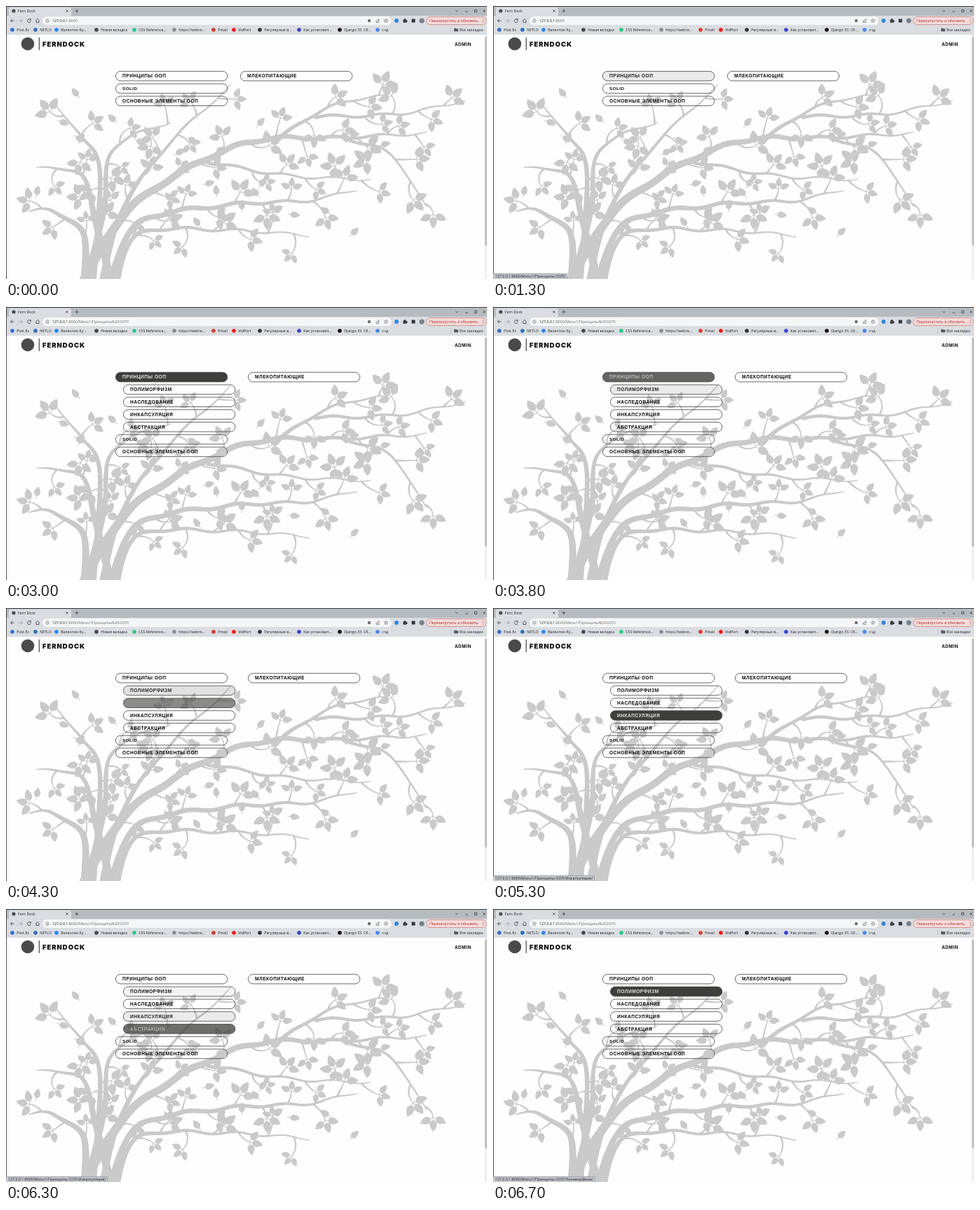
Recreate the animation shown at these times as an HTML page with a canvas. Size 686 px wide and 390 px high, loop 8000 ms.

```html
<!DOCTYPE html>
<html lang="ru">
<head>
<meta charset="utf-8">
<title>Fern Dock</title>
<style>
  html, body { margin: 0; width: 100%; height: 100%; overflow: hidden; background: #fefefe; }
  canvas, svg { position: absolute; left: 0; top: 0; }
  text, #status { font: 5.3px "Open Sans", sans-serif; white-space: pre; }
  .item text { font: bold 6.6px "Liberation Sans", sans-serif; letter-spacing: .52px; }
  .brand { font: 900 9.5px Inter, sans-serif; letter-spacing: .95px; }
  .admin { font: bold 6.2px Inter, sans-serif; letter-spacing: .45px; }
  #status { position: absolute; left: 0; bottom: 0; height: 7px; line-height: 7px; padding: 0 2px 0 3px;
    background: #c3c6ca; color: #17191c; border-top: .5px solid #a0a3a7; border-right: .5px solid #a0a3a7; }
</style>
</head>
<body>
<canvas id="tree" width="686" height="390"></canvas>
<svg id="stage" width="686" height="390"></svg>
<div id="status"></div>
<script>
const stage = document.getElementById('stage');
const statusBar = document.getElementById('status');

function add(parent, tag, attrs, content) {
  const node = document.createElementNS('http://www.w3.org/2000/svg', tag);
  for (const key in attrs) node.setAttribute(key, attrs[key]);
  if (content) node.textContent = content;
  return parent.appendChild(node);
}
const box = (x, y, width, height, fill, rx = 0, more = {}) =>
  add(stage, 'rect', { x, y, width, height, fill, rx, ...more });
const dot = (cx, cy, r, fill) => add(stage, 'circle', { cx, cy, r, fill });
const label = (x, y, content, fill = '#1d2023', more = {}) => add(stage, 'text', { x, y, fill, ...more }, content);
const icon = (x, y, d, stroke = '#383c40', width = .8, fill = 'none') =>
  add(stage, 'path', { d, fill, stroke, 'stroke-width': width, transform: `translate(${x} ${y})` });

// Background tree: limbs through a few key points, with random twigs and leaves
const ctx = document.getElementById('tree').getContext('2d');
ctx.strokeStyle = ctx.fillStyle = '#cacaca';
ctx.lineCap = 'round';
ctx.filter = 'blur(.6px)';

let seed = 11;
const random = (min, max) => {
  seed = seed * 16807 % 2147483647;
  return min + (max - min) * seed / 2147483647;
};

function segment(x0, y0, x1, y1, width) {
  ctx.lineWidth = width;
  ctx.beginPath();
  ctx.moveTo(x0, y0);
  ctx.lineTo(x1, y1);
  ctx.stroke();
}

function leaf(x, y, angle, size) {
  ctx.save();
  ctx.translate(x, y);
  ctx.rotate(angle);
  segment(0, 0, size * .3, 0, 1);
  ctx.translate(size * .25, 0);
  ctx.beginPath();
  ctx.moveTo(0, 0);
  ctx.bezierCurveTo(size * .1, -size * .5, size * .65, -size * .4, size, 0);
  ctx.bezierCurveTo(size * .65, size * .3, size * .15, size * .5, 0, 0);
  ctx.fill();
  ctx.restore();
}

function sprig(x, y, angle) {
  const size = random(12, 18);
  for (const spread of [-1.15, 0, 1.15]) leaf(x, y, angle + spread, size);
}

function twig(x, y, angle) {
  const length = random(14, 30), curl = random(-.12, .12);
  for (let s = 0; s < length; s += 2) {
    const nx = x + 2 * Math.cos(angle), ny = y + 2 * Math.sin(angle);
    segment(x, y, nx, ny, 2.6 - 1.4 * s / length);
    [x, y] = [nx, ny];
    angle += curl;
  }
  sprig(x, y, angle);
}

function spline(a, b, c, d, u) {
  return b + u / 2 * (c - a + u * (2 * a - 5 * b + 4 * c - d + u * (3 * (b - c) + d - a)));
}

function limb(width, ...points) {
  const last = points.length - 1, steps = last * 24;
  const at = i => points[Math.max(0, Math.min(last, i))];
  let [x, y] = points[0], walked = 0, side = 1;
  for (let s = 1; s <= steps; s++) {
    const i = Math.min(last - 1, Math.floor(s / 24)), u = s / 24 - i;
    let [nx, ny] = [0, 1].map(k => spline(at(i - 1)[k], at(i)[k], at(i + 1)[k], at(i + 2)[k], u));
    ny += 2 * Math.sin(nx / 11);
    segment(x, y, nx, ny, width + (1.3 - width) * s / steps);
    walked += Math.hypot(nx - x, ny - y);
    if (walked > 36 && s > steps * .3 && ny < 350 && ny > 120) {
      twig(nx, ny, Math.atan2(ny - y, nx - x) + side * random(.6, 1.2));
      walked = 0;
      side = -side;
    }
    [x, y] = [nx, ny];
  }
}

limb(12, [112, 400], [110, 325], [68, 294], [33, 293]);
limb(13, [152, 400], [128, 310], [106, 240], [44, 232]);
limb(11, [114, 400], [140, 290], [152, 205], [235, 165]);
limb(9, [124, 400], [134, 240], [110, 190], [70, 140]);
limb(15, [108, 400], [180, 286], [335, 198], [480, 188], [600, 182]);
limb(10, [136, 400], [162, 300], [225, 205], [320, 114]);
limb(10, [146, 400], [190, 310], [320, 284], [430, 278], [500, 262]);
limb(8, [156, 400], [190, 326], [310, 320], [432, 328]);
limb(6, [390, 190], [430, 160], [490, 135], [546, 128]);
limb(5, [440, 158], [560, 154], [655, 135]);
limb(5, [480, 188], [550, 214], [600, 288]);
limb(5, [285, 222], [400, 242], [520, 248]);

for (let i = 0; i < 26; i++) {
  const x = random(35, 560);
  leaf(x, random(90, 280) + x / 6, random(-2.6, .6), 14);
}

// Browser window
box(0, 0, 686, 14, '#b6bbc0');
box(0, 14, 686, 27, '#dadde1');
box(4, 2, 89, 13, '#dadde1', 2.5);
dot(11, 7, 2.6, '#4a4e52');
label(17, 9, 'Fern Dock');
const cross = 'M-1.6-1.6L1.6 1.6M1.6-1.6L-1.6 1.6';
icon(87, 7, cross);
icon(101, 7, 'M-2.3 0H2.3M0-2.3V2.3');
icon(643, 7, 'M-1.8-.9L0 .9L1.8-.9');
icon(657, 8, 'M-1.8 0H1.8');
icon(670, 7, 'M-1.6-1.6H1.6V1.6H-1.6Z');
icon(682, 7, cross);

icon(9, 21, 'M2.6 0H-2.4M0-2.4L-2.4 0L0 2.4');
icon(21, 21, 'M-2.6 0H2.4M0-2.4L2.4 0L0 2.4', '#9a9ea3');
icon(33, 21, 'M2-1.5A2.5 2.5 0 1 0 2.5 .6M2.4-2.8V-1H.6');
icon(45, 21, 'M-2.8 0L0-2.6L2.8 0M-2 0V2.5H2V0');
box(52, 15, 498, 12, '#f5f6f7', 6);
icon(59, 21, 'M-2.3 0A2.3 2.3 0 1 1 2.3 0A2.3 2.3 0 1 1-2.3 0M0-.3V1.3M0-1.4V-.9', '#55595e', .6);
const url = label(66, 23, '127.0.0.1');
const urlTail = add(url, 'tspan', { fill: '#686c71' });
dot(518, 21, 2.2, '#6a6e73');
icon(530, 21, 'M-2-.4V2.3H2V.6M-.8 .8Q-.6-1.3 2-1.4M.8-2.7L2.2-1.4L.8-.1', '#55595e', .7);
icon(542, 21, 'M0-2.8L.8-.9L2.8-.8L1.2 .5L1.7 2.4L0 1.3L-1.7 2.4L-1.2 .5L-2.8-.8L-.8-.9Z', '#55595e', .6);
dot(557, 21, 2.9, '#2f83e0');
icon(569, 21, 'M-2.3-1.4H-.8A.9 .9 0 1 1 .8-1.4H2V0A.9 .9 0 1 1 2 1.4V2.6H-2.3Z', '#383c40', .5, '#383c40');
box(578.5, 18.5, 5, 5, '#30343a');
dot(593, 21, 3.6, '#74818c');
box(599.5, 15.5, 85.5, 11, '#f3dcdc', 5.5, { stroke: '#c9605c', 'stroke-width': .6 });
label(604, 23, 'Перезапустить и обновить', '#b3261e');
for (const y of [19, 21, 23]) dot(680.5, y, .55, '#b3261e');

const bookmarks = [
  [9, '#2f6fd0', 'Post.Ex'], [42, '#2b6db3', 'NETLO'], [72, '#2787f5', 'Валентин Ку...'],
  [129, '#44484d', 'Новая вкладка'], [183, '#22c98a', 'CSS Reference...'], [240, '#8a8e93', 'https://webre...'],
  [296, '#d93a2f', 'Pmail'], [325, '#f01818', 'VidPort'], [362, '#2e3236', 'Регулярные в...'],
  [418, '#3b3fd0', 'Как установит...'], [476, '#111', 'Django 33. Сб...'], [530, '#4a86e8', 'счд']
];
for (const [x, color, name] of bookmarks) {
  dot(x, 34, 2.8, color);
  label(x + 6.2, 36, name);
}
box(634, 30, .6, 8, '#aeb2b7');
icon(642, 34, 'M-2.6-2H-.6L0-1.2H2.6V2H-2.6Z', '#55595e', .7, '#55595e');
label(647, 36, 'Все закладки');
box(0, 0, 686, .8, '#22252a');
box(0, 0, .8, 390, '#22252a');
box(682.5, 41, 3.5, 349, '#f0f0f0');
box(683, 44, 3, 298, '#c1c1c1');

// Page header
dot(31, 54, 9.3, '#4a4a4a');
box(46.8, 45, 1, 18, '#222');
label(52, 57.5, 'FERNDOCK', '#111', { class: 'brand' });
label(640, 56.8, 'ADMIN', '#111', { class: 'admin' });

// Menus: visits are the [enter, leave] times of the pointer
const home = add(stage, 'g', {}), section = add(stage, 'g', {});
const items = [];

function item(page, x, row, name, ...visits) {
  const y = 93.3 + row * 17.8;
  const group = add(page, 'g', { class: 'item' });
  const pill = add(group, 'rect', { x: x + .4, y, width: 159.4, height: 13.6, rx: 6.8, stroke: '#444', 'stroke-width': .8 });
  const text = add(group, 'text', { x: x + 10, y: y + 9 }, name);
  if (name === 'SOLID') text.style.fontSize = '6.2px';
  items.push({ pill, text, visits });
}

const OPEN = 2600, FADE = 400, LOOP = 8000;

item(home, 156, 0, 'ПРИНЦИПЫ ООП', [1260, OPEN]);
item(home, 156, 1, 'SOLID');
item(home, 156, 2, 'ОСНОВНЫЕ ЭЛЕМЕНТЫ ООП');
item(home, 334, 0, 'МЛЕКОПИТАЮЩИЕ');

item(section, 156, 0, 'ПРИНЦИПЫ ООП', [OPEN, 3720]);
item(section, 167, 1, 'ПОЛИМОРФИЗМ', [3760, 4060], [6280, LOOP]);
item(section, 167, 2, 'НАСЛЕДОВАНИЕ', [4060, 4590]);
item(section, 167, 3, 'ИНКАПСУЛЯЦИЯ', [4590, 5940]);
item(section, 167, 4, 'АБСТРАКЦИЯ', [5860, 6230]);
item(section, 156, 5, 'SOLID');
item(section, 156, 6, 'ОСНОВНЫЕ ЭЛЕМЕНТЫ ООП');
item(section, 345, 0, 'МЛЕКОПИТАЮЩИЕ');

// Linear fade in while the pointer stays, linear fade out after it leaves
function hoverAmount(visits, t) {
  const amounts = visits.map(([enter, leave]) =>
    Math.min(1, (Math.min(t, leave) - enter) / FADE) - Math.max(0, t - leave) / FADE);
  return Math.max(0, ...amounts);
}

function statusPath(t) {
  if (t < 1300 || (t >= OPEN && t < 4600)) return '';
  const child = t < OPEN ? '' : t < 5300 ? 'Наследование/' : t < 6600 ? 'Инкапсуляция/' : 'Полиморфизм/';
  return '127.0.0.1:8000/Menu1/Принципы ООП/' + child;
}

function render(now) {
  const t = Math.floor(now % LOOP / 100) * 100;
  const opened = t >= OPEN;
  home.style.display = opened ? 'none' : '';
  section.style.display = opened ? '' : 'none';
  urlTail.textContent = opened ? ':8000/Menu1/Принципы%20ООП/' : ':8000';
  for (const { pill, text, visits } of items) {
    const k = hoverAmount(visits, t), tone = Math.round(10 + 220 * k);
    pill.setAttribute('fill', `rgba(62,62,60,${k})`);
    text.setAttribute('fill', `rgb(${tone},${tone},${tone})`);
  }
  const path = statusPath(t);
  statusBar.textContent = path;
  statusBar.style.display = path ? '' : 'none';
  requestAnimationFrame(render);
}
requestAnimationFrame(render);
</script>
</body>
</html>
```
